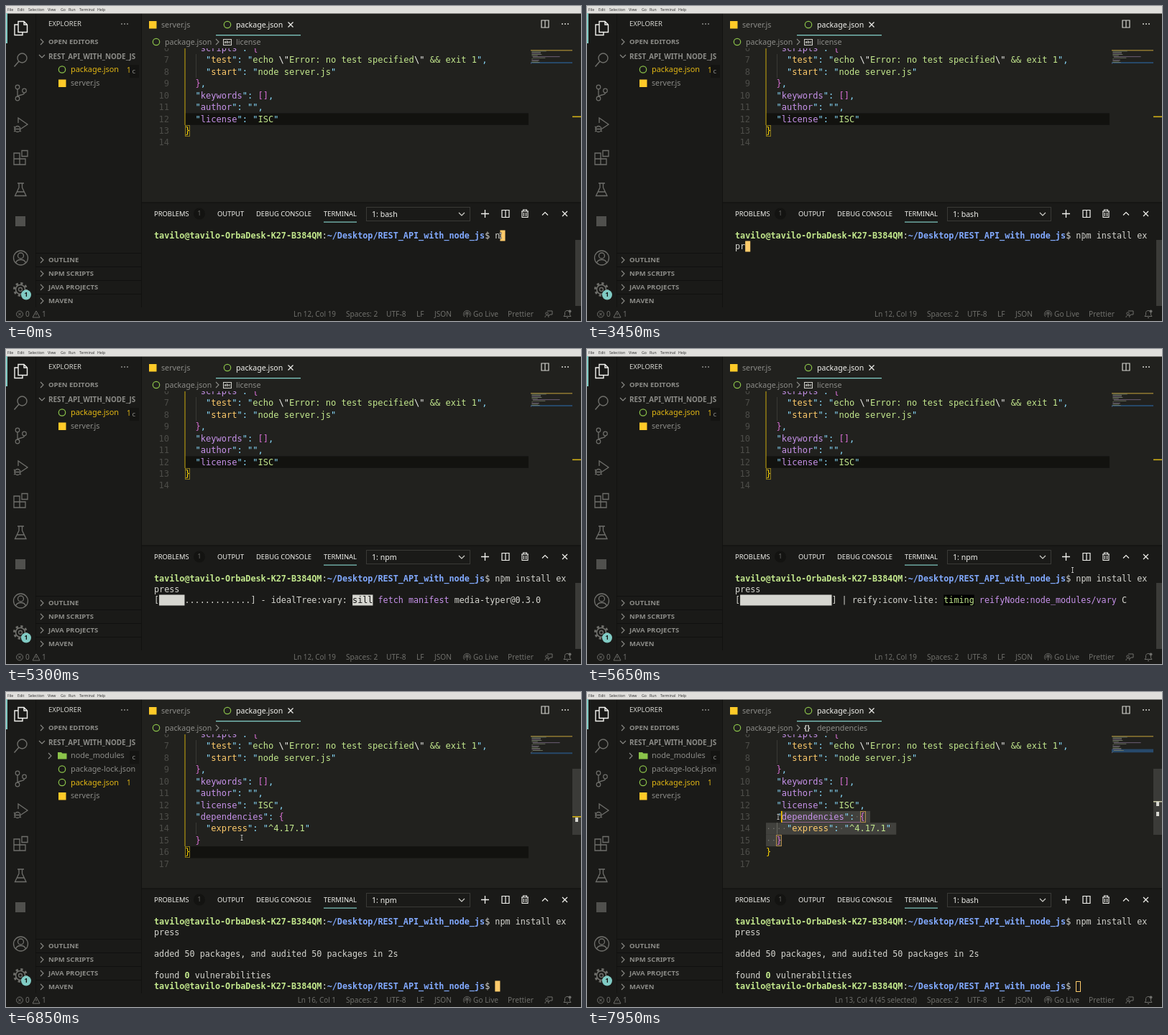
Recreate the animation shown at these times as an HTML page with a canvas. Size 800x439 px, loop 8 s.

```html
<!DOCTYPE html>
<html lang="en">
<head>
<meta charset="utf-8">
<title>Installing a package</title>
<style>
html, body { margin: 0; width: 100%; height: 100%; overflow: hidden; background: #1a1a18; }
canvas { display: block; }
</style>
</head>
<body>
<canvas id="stage" width="800" height="439"></canvas>
<script>
const g = document.getElementById('stage').getContext('2d');
const LOOP = 8000;
const UI = '"Noto Sans", "Open Sans", sans-serif';
const MONO = '"DejaVu Sans Mono", monospace';
const C = {
  side: '#1a1a18', edit: '#21211e', dark: '#12120f', dim: '#6f6f6b', mid: '#8c8c88', text: '#d6d6d0',
  white: '#f2f2ee', teal: '#80cbc4', gold: '#ffd700', orchid: '#da70d6', warn: '#e2b714',
  key: '#c792ea', key2: '#ffcb6b', str: '#c3e88d', quote: '#89ddff', blue: '#82aaff', num: '#4c4c48',
  green: '#8bc34a', js: '#ffca28', guide: '#393935', pair: '#b08a4a'
};

// ---- drawing helpers ----
function text(s, x, y, color, size = 10.7, font = UI, weight = 400, align = 'left') {
  g.font = `${weight} ${size}px ${font}`;
  g.fillStyle = color;
  g.textAlign = align;
  g.fillText(s, x, y + size * 0.35);
}
function box(x, y, w, h, color) {
  g.fillStyle = color;
  g.fillRect(x, y, w, h);
}
function frame(x, y, w, h, color) {
  g.strokeStyle = color;
  g.lineWidth = 1;
  g.strokeRect(Math.round(x) + 0.5, Math.round(y) + 0.5, w - 1, h - 1);
}
function line(d, color, width = 1.1) {
  g.strokeStyle = color;
  g.lineWidth = width;
  g.stroke(new Path2D(d));
}
function dot(x, y, r, color) {
  g.fillStyle = color;
  g.beginPath();
  g.arc(x, y, r, 0, 7);
  g.fill();
}
function ring(x, y, r, color, width = 1.2) {
  g.strokeStyle = color;
  g.lineWidth = width;
  g.beginPath();
  g.arc(x, y, r, 0, 7);
  g.stroke();
}
const right = (x, y, c) => line(`M${x - 2} ${y - 4}l4 4-4 4`, c);
const down = (x, y, c) => line(`M${x - 4} ${y - 2}l4 4 4-4`, c);
const cross = (x, y, c) => line(`M${x - 3.5} ${y - 3.5}l7 7m0-7l-7 7`, c, 1.2);
const split = (x, y, c) => line(`M${x - 5} ${y - 5}h10v10h-10zM${x} ${y - 5}v10`, c, 1.2);
const dots = (x, y, c) => [-4, 0, 4].forEach(k => dot(x + k, y, 1, c));
const jsIcon = (x, y) => box(x - 5, y - 5, 10.5, 10.5, C.js);
const nodeIcon = (x, y) => ring(x, y, 4.7, C.green, 1.2);

// ---- timeline ----
const COMMAND = 'npm install express';
const KEYS = [0, 150, 850, 1000, 1250, 1350, 1450, 1750, 1850, 2000, 2150, 2600,
  2850, 3100, 3250, 3450, 3600, 3850, 4000];
const ENTER = 4350, TITLE = 4500, SAVED = 5850, COLORED = 6100, FILES = 6300, DONE = 6550,
  BASH = 6900, CLICK = 7450;
const POINTER = [[0, 688, 320], [200, 690, 320], [5600, 690, 320], [6000, 577, 226], [6100, 577, 226],
  [6800, 328, 203], [6900, 328, 203], [7200, 274, 207], [7450, 274, 207], [7900, 266, 174]];
// start, filled cells, spinner, stage, level, action, detail
const PROGRESS = [
  [4600, 0, '-', 'idealTree:REST_API_with_node_js:', 'sill', 'idealTree', 'buildDeps'],
  [5050, 0, '\\', 'idealTree:REST_API_with_node_js:', 'sill', 'idealTree', 'buildDeps'],
  [5200, 5, '-', 'idealTree:vary:', 'sill', 'fetch manifest', 'media-typer@0.3.0'],
  [5450, 9, '\\', 'idealTree:send:', 'sill', 'fetch manifest', 'mime@1.6.0'],
  [5650, 18, '|', 'reify:iconv-lite:', 'timing', 'reifyNode:node_modules/vary', 'C'],
  [5900, 18, '-', 'reify:iconv-lite:', 'timing', 'reifyNode:node_modules/express', 'C']
];

function pointerAt(t) {
  const i = POINTER.findIndex(p => p[0] > t);
  if (i < 0) return POINTER[POINTER.length - 1].slice(1);
  const [a, b] = [POINTER[i - 1], POINTER[i]];
  const k = (t - a[0]) / (b[0] - a[0]);
  return [1, 2].map(j => a[j] + (b[j] - a[j]) * k);
}
const selectedLine = t => t < 7550 ? 15 : t < 7750 ? 14 : 13;

// ---- window parts ----
function menuBar() {
  box(0, 0, 800, 10.5, '#e0dfdc');
  [['File', 2], ['Edit', 16], ['Selection', 31], ['View', 58], ['Go', 76], ['Run', 87], ['Terminal', 102], ['Help', 127]]
    .forEach(([s, x]) => text(s, x, 5, '#333', 5.2));
}

function activityBar() {
  const c = C.dim;
  box(0, 10, 2, 42, C.teal);
  line('M17 21.5h8l4.5 4.5v10.5h-12.5zM17 26h-5v14.5h11v-4M25 21.5v4.5h4.5', C.white, 1.4);
  ring(22.5, 72.5, 6.5, c, 1.4);
  line('M18 77l-6.5 7.5', c, 1.5);
  ring(16, 113, 2.8, c); ring(16, 129, 2.8, c); ring(25.5, 118, 2.8, c);
  line('M16 116v10M25.5 121c0 4-9.5 2-9.5 6', c, 1.3);
  line('M17 163v-7l13 9-9 6M11 168l2 2M11 175l2-1M21 175l-2-1M11.5 171.5h9', c, 1.3);
  ring(16, 171.5, 4, c, 1.3);
  line('M11 205h8v16h-8zM11 213h16v8h-16M22 201.5h8v8h-8z', c, 1.3);
  line('M16 247h9M18 247v6l-5.5 11.5h15.5l-5.5-11.5v-6M15.5 259h10', c, 1.3);
  box(13, 293, 14, 14, '#50504d');
  ring(20.5, 351, 10, c, 1.3); ring(20.5, 348, 4, c, 1.3);
  line('M13.5 358c2-6 12-6 14 0', c, 1.3);
  ring(20, 395, 6.5, c, 1.6); ring(20, 395, 2.5, c, 1.3);
  g.setLineDash([3.2, 3.48]);
  ring(20, 395, 8.5, c, 3);
  g.setLineDash([]);
  dot(28, 402.5, 7, C.teal);
  text('1', 28, 402.5, '#111', 8.5, UI, 600, 'center');
}

function sideBar(t) {
  text('EXPLORER', 59, 25, C.text, 9.5);
  dots(165, 25, C.mid);
  right(50, 50, C.mid);
  text('OPEN EDITORS', 59, 50, C.mid, 9.5, UI, 700);
  down(50, 70, C.mid);
  text('REST_API_WITH_NODE_JS', 59, 70.6, C.mid, 9.9, UI, 700);
  let y = 89;
  if (t >= FILES) {
    right(61, 89, C.mid);
    g.fillStyle = C.green;
    g.fill(new Path2D('M72 84h5l1.5 1.5h6v8h-12.5z'));
    text('node_modules', 90, 88.5, C.mid, 10.8);
    nodeIcon(78, 107.5);
    text('package-lock.json', 90, 107, C.mid, 10.8);
    y = 126.5;
  }
  nodeIcon(78, y - 0.5);
  text('package.json', 90, y - 0.5, C.warn, 10.9);
  text('1', 168, y, C.warn, 10);
  jsIcon(78, y + 18.5);
  text('server.js', 90, y + 18, C.mid, 10.7);
  box(172, 82, 13, 18, '#141412');
  text('c', 175.5, 91, C.mid, 9.5);
  ['OUTLINE', 'NPM SCRIPTS', 'JAVA PROJECTS', 'MAVEN'].forEach((s, i) => {
    const v = 354 + 19 * i;
    box(41, v - 10, 147, 1, '#10100f');
    right(50, v, C.mid);
    text(s, 59, v, C.mid, 9.5, UI, 700);
  });
}

function tabs(t) {
  jsIcon(204, 26);
  text('server.js', 216, 26, C.mid);
  nodeIcon(308, 26);
  text('package.json', 320, 26, C.white, 10.6);
  cross(396, 26, C.white);
  box(292, 40, 118, 1.3, C.teal);
  split(750, 25, C.text);
  dots(778, 25, C.text);
  nodeIcon(209, 50);
  text('package.json', 221, 50, C.mid, 10.6);
  right(294, 50, C.mid);
  if (t < COLORED) {
    frame(302, 46, 12, 9, C.text);
    text('abc', 308, 50.3, C.text, 5.2, UI, 700, 'center');
    text('license', 320, 50, C.mid);
  } else if (t < CLICK) {
    text('…', 301, 50, C.mid);
  } else {
    text('{}', 302, 50, C.text, 10.5, UI, 600);
    text('dependencies', 320, 50, C.mid);
  }
}

// ---- editor ----
const CW = 7.25, X0 = 249;
const lineY = n => 75.25 + (n - 7) * 16.43;
const BASE = ['  "scripts": {', '    "test": "echo \\"Error: no test specified\\" && exit 1",',
  '    "start": "node server.js"', '  },', '  "keywords": [],', '  "author": "",', '  "license": "ISC"'];
const BEFORE = [...BASE, '}', ''];
const AFTER = [...BASE.slice(0, 6), '  "license": "ISC",', '  "dependencies": {', '    "express": "^4.17.1"', '  }', '}', ''];

function code(s, y, plain) {
  const put = (part, at, color) => text(part, X0 + at * CW, y, color, 12.04, MONO);
  if (plain) return put(s, 0, C.white);
  const depth = s.search(/\S/);
  for (const m of s.matchAll(/"((?:\\.|[^"\\])*)"(:?)|[{}[\]]|,/g)) {
    const at = m.index;
    if (m[1] === undefined) {
      put(m[0], at, m[0] === ',' ? C.quote : depth ? C.orchid : C.gold);
      continue;
    }
    const color = !m[2] ? C.str : depth > 2 ? C.key2 : C.key;
    put('"', at, C.quote);
    for (const p of m[1].matchAll(/\\.|[^\\]+/g))
      put(p[0], at + 1 + p.index, p[0][0] === '\\' ? C.white : color);
    put('"' + m[2], at + m[1].length + 1, C.quote);
  }
}

function editor(t) {
  const saved = t >= SAVED, clicked = t >= CLICK;
  const lines = saved ? AFTER : BEFORE;
  const current = clicked ? selectedLine(t) : saved ? 16 : 12;
  const selecting = clicked && current < 15;
  g.save();
  g.beginPath();
  g.rect(189, 59, 611, 215);
  g.clip();
  if (!selecting) box(X0, lineY(current) - 8, 478, 16.4, C.dark);
  if (selecting) for (let n = current; n <= 15; n++) {
    const s = lines[n - 6], from = n === current ? 3 : 0, to = n === 15 ? 3 : s.length + 1;
    box(X0 + from * CW, lineY(n) - 8, (to - from) * CW, 16.5, '#41413d');
    for (let k = from; k < to; k++)
      if (s[k] === ' ') dot(X0 + (k + 0.5) * CW, lineY(n), 0.7, '#85857f');
  }
  box(264, 67, 1, 33, C.guide);
  if (saved) box(264, 182, 1, 16.5, clicked ? '#66665f' : C.guide);
  if (!clicked) box(248.5, 59, 1, (!saved ? 166 : t < COLORED ? 150 : 215) - 59, '#c9a90e');
  lines.forEach((s, i) => {
    const n = i + 6, y = lineY(n);
    text(n, 227, y, C.num, 12.04, MONO, 400, 'right');
    code(s, y, saved && t < COLORED && n > 12 && n < 16);
  });
  if (!clicked) frame(X0, lineY(saved ? 16 : 13) - 8, 7, 16, '#8d7a1c');
  else {
    frame(380, lineY(13) - 8, 8, 16, C.pair);
    frame(263, lineY(15) - 8, 8, 16, C.pair);
    box(271, 181, 110, 1, '#8d6488');
    box(X0 + 3 * CW - 0.8, lineY(current) - 8, 1.6, 16, '#ffcc00');
  }
  g.restore();
  minimap(lines, current, selecting);
  if (saved) box(788, 107, 12, 92, '#3b3b38');
  if (clicked) {
    box(788, 152, 12, 1.5, '#c9c9a8');
    box(792, 153, 4, 6, C.text);
    box(792, 167, 4, 6, C.text);
  } else {
    box(788, saved ? 173 : 153.5, 12, 1.6, '#cfae16');
    if (t >= COLORED) box(792, 175, 4, 6, C.text);
  }
}

function minimap(lines, current, selecting) {
  const row = n => 61 + (n - 1) * 1.55;
  box(730, 61, 58, 1.6, '#8a7430');
  box(730, row(current), 58, selecting ? (16 - current) * 1.55 : 2, '#27496b');
  [0, 31, 20, 20, 22, ...lines.map(s => s.length)].forEach((len, i) => {
    if (!len) return;
    const pad = i > 4 ? lines[i - 5].search(/\S/) : 2;
    box(730 + pad * 0.7, row(i + 1), Math.max(1, (len - pad) * 0.7), 0.8, i % 3 ? '#77806a' : '#7d6b88');
  });
}

// ---- panel and terminal ----
const TW = 7.08, COLS = 81;
function cell(s, col, row, color = C.text, weight = 400) {
  text(s, 206 + col * TW, 320 + row * 15, color, 11.76, MONO, weight);
}
function prompt(row) {
  cell('tavilo@tavilo-OrbaDesk-K27-B384QM', 0, row, C.str, 700);
  cell(':', 33, row);
  cell('~/Desktop/REST_API_with_node_js', 34, row, C.blue, 700);
  cell('$', 65, row);
}
function caret(col, row, hollow) {
  const x = 206 + col * TW, y = 312.5 + row * 15;
  if (hollow) frame(x, y, 7, 15, C.key2);
  else box(x, y, TW, 15, C.key2);
}

function panelHead(t) {
  box(189, 274, 611, 146, C.side);
  box(189, 273.5, 611, 1, '#0e0e0d');
  [['PROBLEMS', 206], ['OUTPUT', 294], ['DEBUG CONSOLE', 348], ['TERMINAL', 442]]
    .forEach(([s, x]) => text(s, x, 290, C.white, 9.4));
  dot(269, 289.5, 8, '#131311');
  text('1', 269, 289.5, C.dim, 8.5, UI, 400, 'center');
  box(442, 300.5, 46, 1.2, C.teal);
  frame(501, 280, 145, 20, '#3a3a37');
  text(t >= TITLE && t < BASH ? '1: npm' : '1: bash', 509, 290, C.white, 10.6);
  down(634, 290, C.text);
  line('M661 289.5h11M666.5 284v11', C.white, 1.3);
  split(695, 289.5, C.white);
  line('M717 286h10M719.5 286v-2h5v2M718 286v8.5h8v-8.5M720.5 288v5M723.5 288v5', C.white);
  line('M746 291.5l4-4 4 4', C.white, 1.2);
  cross(777.5, 289.5, C.white);
  // the scroll slider shows only while the pointer is over the panel
  if (pointerAt(t)[1] > 274) box(792, 326, 8, 92, '#3b3b38');
}

function progress(t) {
  const step = PROGRESS.filter(p => p[0] <= t).pop();
  if (!step) return caret(0, 2);
  const [, filled, spin, stage, level, action, detail] = step;
  cell('[' + ' '.repeat(filled) + '.'.repeat(18 - filled) + '] ' + spin + ' ' + stage, 0, 2);
  box(206 + TW, 342.5, filled * TW, 15, C.text);
  const at = 24 + stage.length, next = at + level.length + 1, sill = level === 'sill';
  box(206 + at * TW, 342.5, level.length * TW, 15, sill ? C.text : '#000');
  cell(level, at, 2, sill ? '#111' : C.str);
  cell(action, next, 2, C.key);
  cell(detail, next + action.length + 1, 2);
}

function terminal(t) {
  prompt(0);
  const typed = COMMAND.slice(0, KEYS.filter(k => k <= t).length);
  const start = 67, room = COLS - start;
  cell(typed.slice(0, room), start, 0);
  cell(typed.slice(room), 0, 1);
  if (t < ENTER) {
    const at = start + typed.length;
    caret(at % COLS, Math.floor(at / COLS));
  } else if (t < DONE) {
    progress(t);
  } else {
    cell('added 50 packages, and audited 50 packages in 2s', 0, 3);
    cell('found', 0, 5);
    cell('0', 6, 5, C.str, 700);
    cell('vulnerabilities', 8, 5);
    prompt(6);
    caret(start, 6, t >= CLICK);
  }
}

function statusBar(t) {
  const c = C.dim, y = 429.5;
  box(0, 420, 800, 19, C.side);
  ring(19, y, 4.5, c, 1);
  line('M17 427.5l4 4m0-4l-4 4M42 425l5 9h-10zM42 428v3', c, 1);
  text('0', 27, y, c, 10.1);
  text('1', 50, y, c, 10.1);
  const n = selectedLine(t);
  const place = t >= CLICK ? `Ln ${n}, Col 4` + ({ 13: ' (45 selected)', 14: ' (25 selected)' }[n] || '')
    : t >= SAVED ? 'Ln 16, Col 1' : 'Ln 12, Col 19';
  text(place, 459, y, c, 9.9, UI, 400, 'right');
  [['Spaces: 2', 473], ['UTF-8', 529], ['LF', 571], ['JSON', 596], ['Go Live', 650], ['Prettier', 698]]
    .forEach(([s, x]) => text(s, x, y, c, 10.2));
  dot(641.5, 428.5, 1.3, c);
  line('M639 431a3 3 0 1 1 5 0M638 433a5 5 0 1 1 7 0M641.5 429v5', c, 0.9);
  line('M753 425h7v5h-3l-2 2v-2M750 434c0-4 5-4 5 0', c, 1);
  ring(752.5, 428.5, 1.7, c, 1);
  line('M776 432.5h10l-1.5-2v-3c0-4-7-4-7 0v3zM780 434.5h2', c, 1);
  dot(784.5, 425.5, 2, c);
}

function pointer(t) {
  const [x, y] = pointerAt(t);
  const d = `M${x - 1.5} ${y - 3.5}h3M${x} ${y - 3.5}v7M${x - 1.5} ${y + 3.5}h3`;
  line(d, '#111', 2);
  line(d, '#e8e8e4', 0.8);
}

function draw(now) {
  const t = now % LOOP;
  box(0, 0, 800, 439, C.side);
  box(189, 10, 611, 264, C.edit);
  box(41, 10, 1, 410, '#141412');
  box(188, 10, 1, 410, '#111110');
  menuBar();
  activityBar();
  sideBar(t);
  tabs(t);
  editor(t);
  panelHead(t);
  terminal(t);
  statusBar(t);
  pointer(t);
}

const begin = performance.now();
(function tick() {
  draw(performance.now() - begin);
  requestAnimationFrame(tick);
})();
</script>
</body>
</html>
```
